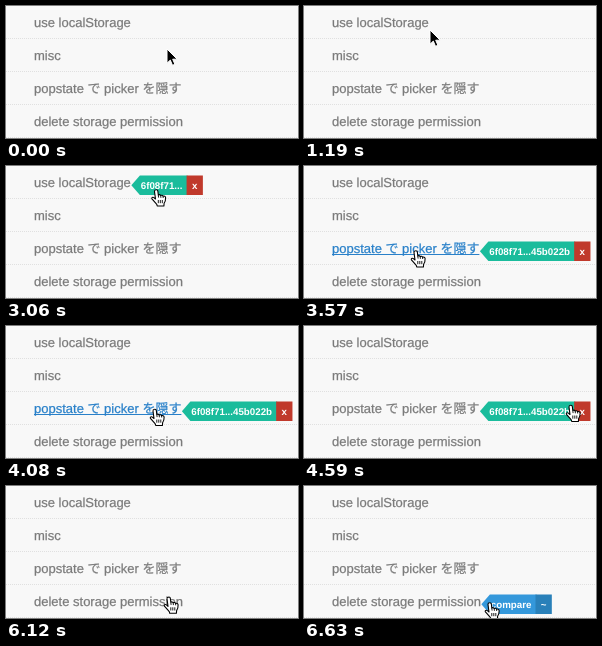
Animation, 292 px wide and 132 px high, one loop 6.8 s. Source, as an HTML page:

```html
<!DOCTYPE html>
<html lang="ja">
<head>
<meta charset="utf-8">
<title>Compare picker</title>
<style>
html, body { margin: 0; width: 100%; height: 100%; overflow: hidden; background: #f8f8f8; }
svg { display: block; width: 292px; height: 132px; }
text {
  font-family: "Liberation Sans", "Noto Sans CJK JP", "Noto Sans CJK", sans-serif;
  font-size: 13px; text-rendering: geometricPrecision; stroke-width: .25px;
}
.tag { font-size: 9.75px; font-weight: bold; fill: #fff; }
</style>
</head>
<body>
<svg id="stage" viewBox="0 0 292 132">
  <rect width="292" height="132" fill="#f8f8f8"/>
  <g id="list"></g>
  <g id="label">
    <path id="body"/>
    <rect id="end" width="16.3" height="19.5"/>
    <text id="main" class="tag" x="9.4" y="13"></text>
    <text id="mark" class="tag" y="13" text-anchor="middle"></text>
  </g>
  <g id="arrow">
    <path d="M0 0V14.2L3.3 11.1L5.5 16.3L7.9 15.3L5.7 10.2H10.2Z" fill="#000" stroke="#fff" stroke-width="1"/>
  </g>
  <g id="hand">
    <path transform="translate(-5.6 -1)" fill="#fff" stroke="#000" stroke-width="1.1" stroke-linejoin="round"
      d="M5.2 .8C6.3 .6 6.9 1.4 7 2.5L7.4 6C8 5.4 9.3 5.5 9.8 6.5C10.6 5.9 11.8 6.2 12.2 7.2C13.2 6.7 14.6 7.1 14.7 8.6C14.8 10.5 14.4 12.5 13.2 14.3L13 17H6.3L6 15.6C4.5 14 3 12 1 9.8C.4 8.6 1.8 7.8 3 8.6L4.6 10L3.6 2.6C3.5 1.6 4.2 .9 5.2 .8Z"/>
    <path transform="translate(-5.6 -1)" d="M7.4 6L7.7 8.6M9.8 6.5L10 8.8M12.2 7.2L12.3 9M7.4 11V14.2M9.4 11V14.2M11.4 11V14.2" fill="none" stroke="#000" stroke-width=".9"/>
  </g>
</svg>
<script>
const LOOP = 6800, TICK = 170, PITCH = 33, LEFT = 28;
const GREY = '#7b7b7b', BLUE = '#2980c9';
const $ = id => document.getElementById(id);
const set = (el, attrs) => { for (const k in attrs) el.setAttribute(k, attrs[k]); };
const add = (tag, attrs) => {
  const el = document.createElementNS('http://www.w3.org/2000/svg', tag);
  set(el, attrs);
  $('list').appendChild(el);
  return el;
};

const rows = ['use localStorage', 'misc', 'popstate で picker を隠す', 'delete storage permission'].map((name, i) => {
  const y = i * PITCH;
  add('path', { d: `M0 ${y + 32.5}H292`, stroke: '#e0e0e0', 'stroke-dasharray': '1 1' });
  const text = add('text', { x: LEFT, y: y + 21 });
  text.textContent = name;
  const width = text.getComputedTextLength();
  const line = add('rect', { x: LEFT, y: y + 22, width, height: 1, fill: BLUE });
  return { text, line, width };
});

const tags = {
  compare: ['compare', '~', '#3498db', '#2980b9'],
  first: ['6f08f71...', 'x', '#1abc9c', '#c0392b'],
  range: ['6f08f71...45b022b', 'x', '#1abc9c', '#c0392b']
};

// time, cursor, underlined row, row with label, label
const states = [
  [0, 'arrow', -1],
  [1360, 'hand', 0, 0, 'compare'],
  [2210, 'hand', -1, 0, 'compare'],
  [2720, 'hand', -1, 0, 'first'],
  [3230, 'arrow', -1],
  [3570, 'hand', 2, 2, 'range'],
  [4250, 'hand', -1, 2, 'range'],
  [5100, 'hand', -1],
  [5440, 'arrow', -1],
  [6120, 'hand', -1],
  [6290, 'hand', 3, 3, 'compare'],
  [6630, 'hand', -1, 3, 'compare']
];

// time, x, y of the pointer tip
const path = [
  [0, 161, 43], [510, 161, 43], [1020, 138, 29], [1360, 114, 19], [1700, 111, 18],
  [2040, 120.8, 18], [2380, 150.5, 24], [3060, 150.5, 24], [3400, 122, 70],
  [3570, 112, 85], [3910, 115, 85], [4250, 183, 82], [4590, 267, 79.5],
  [4930, 268, 79.5], [5270, 268, 79.5], [5780, 218, 103], [6120, 163, 111.3],
  [6460, 173, 113], [6630, 186, 117], [LOOP, 186, 117]
];

function pointAt(t) {
  const i = path.findIndex(p => p[0] > t);
  const a = path[i - 1], b = path[i];
  const k = (t - a[0]) / (b[0] - a[0]);
  return [a[1] + (b[1] - a[1]) * k, a[2] + (b[2] - a[2]) * k];
}

function drawLabel(row, key) {
  $('label').style.display = key ? '' : 'none';
  if (!key) return;
  const [main, mark, color, endColor] = tags[key];
  $('main').textContent = main;
  $('mark').textContent = mark;
  const w = 13.5 + $('main').getComputedTextLength();
  set($('body'), { d: `M0 9.75L8.5 0H${w + 1}V19.5H8.5Z`, fill: color });
  set($('end'), { x: w, fill: endColor });
  set($('mark'), { x: w + 8.1 });
  set($('label'), { transform: `translate(${LEFT + rows[row].width + 0.5} ${row * PITCH + 9.5})` });
}

function render(time) {
  const t = Math.floor((time % LOOP) / TICK) * TICK;
  const [, cursor, active, row, key] = states.filter(s => s[0] <= t).pop();
  rows.forEach((r, i) => {
    const color = i === active ? BLUE : GREY;
    set(r.text, { fill: color, stroke: color });
    r.line.style.display = i === active ? '' : 'none';
  });
  drawLabel(row, key);
  const [x, y] = pointAt(t);
  for (const id of ['arrow', 'hand']) {
    $(id).style.display = id === cursor ? '' : 'none';
    set($(id), { transform: `translate(${x} ${y})` });
  }
}

const start = performance.now();
function loop() {
  render(performance.now() - start);
  requestAnimationFrame(loop);
}
loop();
</script>
</body>
</html>
```
